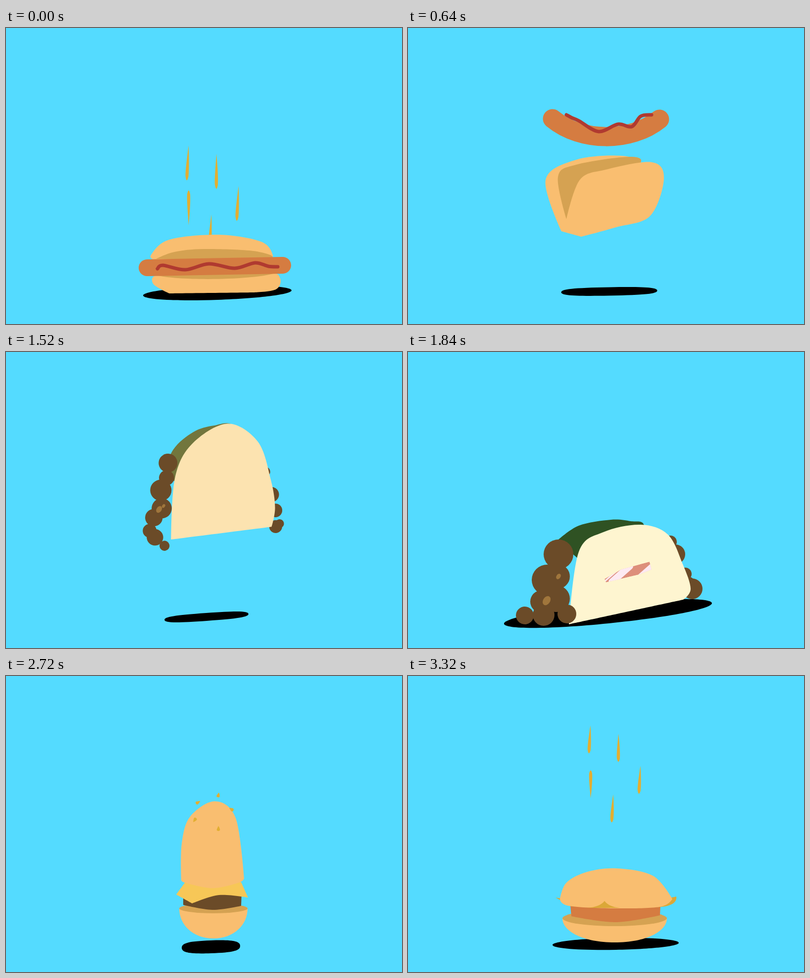
An HTML page with a canvas that plays this animation: 800 px wide and 600 px high, repeating every 3.4 s.

```html
<!DOCTYPE html>
<html lang="en">
<head>
<meta charset="utf-8">
<title>Bouncing snacks</title>
<style>
html, body { margin: 0; width: 100%; height: 100%; overflow: hidden; background: #54dbff; }
canvas { display: block; }
</style>
</head>
<body>
<canvas id="stage" width="800" height="600"></canvas>
<script>
const ctx = document.getElementById('stage').getContext('2d');
const LOOP = 3400, PIVOT = 412;
const BUN = 'rgb(249 190 112)', INNER = '#d5a252', MEAT = '#6b4b28';

// Poses: 0 hot dog, 1 open bun, 2 taco, 3 squashed roll, 4 sushi, 5 tall burger, 6 flat burger.
// Every layer holds outline points by pose; base is the lowest y of the pose.
const base = [538, 423, 455, 552, 333, 532, 540];

const front = [
  '330,538 297,518 312,499 420,500 530,495 554,508 545,530 500,536',
  '320,388 347,308 400,287 492,272 517,305 489,381 420,404 350,423',
  '333,455 331,340 355,240 432,172 505,225 531,325 534,390 533,446',
  '325,552 345,405 395,365 470,350 525,370 555,430 571,480 556,502',
  '375,333 358,250 370,153 420,119 485,103 498,190 492,276 440,312'
];
const back = [
  '300,470 293,460 330,429 430,419 515,433 539,460 530,468',
  '310,412 278,308 340,267 430,259 468,276 480,340 350,423',
  '312,360 325,270 350,212 395,185 450,180 510,260 510,360',
  '302,382 345,352 410,340 450,343 476,349 470,390 345,420',
  '302,309 294,152 345,115 392,96 480,102 487,110 375,333'
];
const inner = [
  '303,468 340,454 400,448 500,452 535,466 420,469',
  '320,387 303,302 340,277 448,261 468,276 400,320'
];
const salmon = {
  3: '397,460 430,441 488,425 492,441 467,451 400,467',
  4: '400,190 430,169 460,159 470,222 455,255 400,267'
};
const stripes = {
  3: '448,434 412,466 425,441 397,465 496,432 470,455',
  4: '463,163 424,272 427,168 397,238 471,212 449,262'
};

// x, y, radius: left blobs, right blobs, spots
const LEFT = 8, RIGHT = 13;
const meat = {
  2: '338 275 12 334 296 9 329 338 16 317 377 17 311 408 15 322 436 12 312 462 14 311 496 4 ' +
     '530 328 8 545 396 13 544 425 16 534 463 8 556 460 5 323 378 6 321 404 3',
  3: '304 410 30 302 455 25 281 462 31 300 500 27 270 506 23 236 534 18 274 533 22 321 531 19 ' +
     '530 385 13 540 410 20 560 450 13 574 480 21 565 470 15 280 504 10 304 455 6'
};
meat[4] = meat[3].split(' ').map((n, i) => i % 3 > 1 ? 0 : n).join(' ');

const topBun = {
  5: '354,414 355,340 372,285 422,254 464,288 481,410 470,419 418,430 365,420',
  6: '307,452 320,419 362,397 422,390 495,405 534,452 508,468 415,471 325,466'
};
const cheese = {
  5: '344,443 362,418 475,418 489,449 430,444 376,461',
  6: '298,449 316,452 528,450 542,447 512,468 330,467'
};
const patty = {
  5: '358,440 476,440 475,466 417,474 358,464',
  6: '328,465 510,465 509,485 420,499 330,487'
};
const rim = { 5: '419,471 69,10', 6: '417.5,491 105.5,16' };

const sausage = ['M285 486C380 484 460 483 559 481', 'M292 184C350 232 450 232 508 185'];
const ketchup = [
  '306,488 317,481 362,490 410,478 462,487 503,476 530,483 549,484',
  '320,176 331,182 345,188 385,210 424,195 452,200 470,179 492,176'
];

// x, y, angle when leaving the bun, then x, y when falling
const seeds = [
  [388, 256, 1, 367, 128], [429, 241, .2, 425, 145], [455, 270, -1, 468, 210],
  [381, 292, .6, 369, 220], [429, 309, 0, 413, 268]
];

// time, pose
const poseTrack = [
  [0, 0], [240, 0], [560, 1], [720, 1], [840, 3], [880, 3], [960, 2], [1360, 2],
  [1720, 3], [1840, 3], [2080, 4], [2560, 4], [2640, 6], [2720, 5], [2840, 5], [3320, 6]
];

// One track per hop: time, bottom y, width scale, height scale
const hotdogHop = [
  [0, 538, 1, 1], [80, 538, 1.01, .97], [160, 538, .85, 1.4], [240, 515, .68, 1.75], [400, 375, .8, 1.3],
  [480, 375, .95, 1.1], [640, 423, 1, 1], [720, 500, .95, 1.08], [800, 550, 1.05, .85]
];
const tacoHop = [
  [840, 552, 1.2, .8], [880, 552, 1.22, .75], [960, 545, .95, 1], [1040, 510, .92, 1.02], [1120, 455, 1, 1],
  [1200, 350, 1, .95], [1280, 315, 1.05, .87], [1440, 330, 1, .84], [1520, 380, .95, .95], [1680, 530, .88, 1.2]
];
const sushiHop = [
  [1720, 552, 1.15, .85], [1800, 552, 1.35, .75], [1840, 552, 1, 1], [1920, 545, .8, 1.3],
  [2080, 405, .95, 1.05], [2240, 324, 1, 1], [2320, 333, 1, 1], [2400, 368, 1, 1], [2560, 525, .9, 1.15]
];
const burgerHop = [
  [2640, 548, 1.1, .75], [2720, 532, 1, 1], [2840, 390, 1, .95],
  [3000, 335, 1, .9], [3160, 385, .95, 1.05], [3320, 540, 1, 1]
];
// time, bottom y
const sausageTrack = [[0, 502], [160, 488], [240, 450], [400, 285], [560, 227], [640, 240], [720, 330], [800, 500]];

// time, x, y, half width, half height, degrees
const shadowTrack = [
  [0, 427, 537, 150, 14, -2], [320, 408, 535, 80, 8, -1], [640, 406.5, 534, 97, 8.5, -1],
  [840, 411, 540, 247, 16, -3], [960, 418, 537, 150, 12, -2], [1120, 422, 534, 106, 8, -1],
  [1280, 415, 534, 75, 6, -1], [1520, 405, 537, 85, 8, -4], [1720, 384, 540, 221, 17, -4],
  [1800, 390, 542, 260, 19, -4], [1840, 404, 530, 211, 20, -5.7], [1920, 405, 530, 120, 16, -8],
  [2320, 408, 528, 90, 16, -11], [2640, 408, 548, 144, 15, -1], [2720, 414, 549, 59, 13, -2],
  [2920, 418, 545, 50, 9, -1], [3320, 419.5, 543, 127.5, 12, -1]
];
// time, way from bun to fall line, y offset, length
const seedTrack = [
  [2640, 0, 150, 8], [2720, 0, 0, 10], [2840, 1, -90, 12], [3000, 1, -112, 12],
  [3160, 1, -100, 18], [3240, 1, -65, 32], [3320, 1, 0, 56], [3480, 1, 290, 84]
];

const lerp = (a, b, u) => a + (b - a) * u;
const ramp = (t, a, b) => Math.min(1, Math.max(0, (t - a) / (b - a)));
const numbers = text => text.match(/-?[\d.]+/g).map(Number);

function mix(a, b, u) {
  if (!a || !b) return a;
  const goal = numbers(b);
  let i = 0;
  return a.replace(/-?[\d.]+/g, n => lerp(+n, goal[i++], u).toFixed(2));
}

function span(track, t) {
  const i = Math.max(0, track.findLastIndex(k => k[0] <= t));
  const a = track[i], b = track[i + 1] || a;
  return [a, b, a === b ? 0 : ramp(t, a[0], b[0])];
}

function at(track, t) {
  const [a, b, u] = span(track, t);
  return a.slice(1).map((v, i) => lerp(v, b[i + 1], u));
}

// Curve through all points; corners lists the indices that stay sharp.
function smooth(text, corners = [], closed = true) {
  const pts = text.split(' ').map(numbers), n = pts.length;
  const point = i => pts[closed ? (i + n) % n : Math.min(n - 1, Math.max(0, i))];
  const handle = (i, sign) => point(i).map((v, k) =>
    corners.includes(i % n) ? v : v + sign * (point(i + 1)[k] - point(i - 1)[k]) / 6);
  let path = 'M' + pts[0];
  for (let i = 0; i < n - !closed; i++) path += `C${handle(i, 1)} ${handle(i + 1, -1)} ${point(i + 1)}`;
  return path + (closed ? 'Z' : '');
}

function fill(path, color) {
  ctx.fillStyle = color;
  ctx.fill(new Path2D(path));
}

function stroke(path, color, width) {
  ctx.strokeStyle = color;
  ctx.lineWidth = width;
  ctx.stroke(new Path2D(path));
}

function place([y, sx, sy], bottom) {
  ctx.setTransform(sx, 0, 0, sy, PIVOT * (1 - sx), y - bottom * sy);
}

function drawShadow(t) {
  const [x, y, w, h, deg] = at(shadowTrack, t);
  const k = w < 120 ? .75 : .57, a = w * k, b = h * k;
  ctx.save();
  ctx.translate(x, y);
  ctx.rotate(deg * Math.PI / 180);
  fill(`M${-w} 0C${-w} ${-b} ${-a} ${-h} 0 ${-h}S${w} ${-b} ${w} 0S${a} ${h} 0 ${h}S${-w} ${b} ${-w} 0Z`, '#000');
  ctx.restore();
}

function drawSeeds(t) {
  const [u, off, len] = at(seedTrack, t);
  seeds.forEach(([x0, y0, angle, x1, y1], i) => {
    const y = lerp(y0, y1, u) + off, h = len / 2;
    if (y > 440) return;
    ctx.save();
    ctx.translate(lerp(x0, x1, u), y);
    ctx.rotate(lerp(angle, i % 2 ? 0 : .05, u));
    if (i === 3) ctx.scale(1, -1);
    fill(`M0 ${-h}C2 ${-h / 2} 4 ${h * .4} 3 ${h * .8}Q0 ${h * 1.25} -3 ${h * .8}C-4 ${h * .4} -1 ${-h / 2} 0 ${-h}Z`, '#e2ae32');
    ctx.restore();
  });
}

function drawSausage(t) {
  const u = ramp(t, 240, 560), [, sx, sy] = at(hotdogHop, t);
  ctx.save();
  place([...at(sausageTrack, t), sx, sy], lerp(502, 240, u));
  stroke(mix(...sausage, u), '#d57c41', lerp(34, 39, u));
  stroke(smooth(mix(...ketchup, u), [], false), '#b03a30', 7);
  ctx.restore();
}

function drawBlobs(blobs, from, to, color, flat = 1) {
  ctx.fillStyle = color;
  for (let i = from * 3; i < to * 3; i += 3) {
    ctx.beginPath();
    ctx.ellipse(blobs[i], blobs[i + 1], blobs[i + 2] * flat, blobs[i + 2], .6, 0, 7);
    ctx.fill();
  }
}

function drawSalmon(outline, lines, u) {
  const path = smooth(outline, [0, 1, 2, 3, 4, 5]), pts = lines.split(' ');
  ctx.save();
  ctx.clip(new Path2D(path));
  fill(path, '#dd8f7b');
  [lerp(14, 20, u), 3, lerp(12, 5, u)].forEach((width, i) =>
    stroke(`M${pts[i * 2]}L${pts[i * 2 + 1]}`, '#fdeaf2', width));
  ctx.restore();
}

function drawBurger(layer, t, bottom) {
  const u = ramp(t, 2920, 3240), [x, y, w, h] = numbers(layer(rim));
  const l = x - w, r = x + w, side = lerp(y, bottom, .55);
  fill(`M${l} ${y}C${l} ${side} ${x - w * .6} ${bottom} ${x} ${bottom}S${r} ${side} ${r} ${y}Z`, BUN);
  fill(`M${l} ${y}A${w} ${h} 0 0 1 ${r} ${y}A${w} ${h} 0 0 1 ${l} ${y}Z`, INNER);
  fill(smooth(layer(patty), [0, 1, 2, 4]), mix('rgb(107 75 40)', 'rgb(213 124 65)', u));
  fill(smooth(layer(cheese), [0, 1, 2, 3, 5]), mix('rgb(247 199 87)', 'rgb(219 168 56)', u));
  fill(smooth(layer(topBun), [0, 5]), BUN);
  if (t >= 3240) fill('M362 470Q388 468 397 456Q406 468 428 470Z', '#dba838');
}

function drawWrap(layer, t, pose) {
  const dye = ramp(t, 1360, 1600);
  const blobs = t >= 840 && t < 2080 ? numbers(layer(meat)) : [];
  const leftMeat = () => {
    if (!blobs.length) return;
    drawBlobs(blobs, 0, LEFT, MEAT);
    drawBlobs(blobs, RIGHT, RIGHT + 2, '#a0763c', .7);
  };
  fill(smooth(layer(back), [0, 6]), mix(BUN, 'rgb(47 82 35)', dye));
  if (t < 840) fill(smooth(layer(inner), [0, 5]), INNER);
  if (blobs.length) drawBlobs(blobs, LEFT, RIGHT, MEAT);
  if (t < 1700) leftMeat();
  if (t >= 720 && t < 840) drawSausage(t);
  fill(smooth(layer(front), [0, 7]), mix(BUN, 'rgb(254 245 208)', dye));
  if (t < 240) fill('M303 501C350 513 500 511 543 497L543 485L303 485Z', INNER);
  if (t >= 1720) drawSalmon(layer(salmon), layer(stripes), pose - 3);
  if (t >= 1700) leftMeat();
}

function draw(t) {
  ctx.resetTransform();
  ctx.lineCap = 'round';
  ctx.fillStyle = '#54dbff';
  ctx.fillRect(0, 0, 800, 600);
  drawShadow(t);
  if (t < 160) drawSeeds(t + LOOP);

  const [[, a], [, b], u] = span(poseTrack, t);
  const layer = list => mix(list[a], list[b], u);
  const bottom = lerp(base[a], base[b], u);
  const hop = t < 840 ? hotdogHop : t < 1720 ? tacoHop : t < 2640 ? sushiHop : burgerHop;
  ctx.save();
  place(at(hop, t), bottom);
  if (t >= 2640) drawBurger(layer, t, bottom);
  else drawWrap(layer, t, lerp(a, b, u));
  ctx.restore();

  if (t < 720) drawSausage(t);
  if (t >= 2640) drawSeeds(t);
}

// Animated on twos, on ones around the landings.
const ones = [[800, 880], [1680, 1720], [1800, 1920], [2640, 2760]];
const steps = [];
for (let t = 0; t < LOOP;) {
  steps.push(t);
  t += ones.some(([a, b]) => t >= a && t < b) ? 40 : 80;
}

const start = performance.now();
function tick() {
  const t = (performance.now() - start) % LOOP;
  draw(steps.findLast(s => s <= t) || 0);
  requestAnimationFrame(tick);
}
tick();
</script>
</body>
</html>
```
